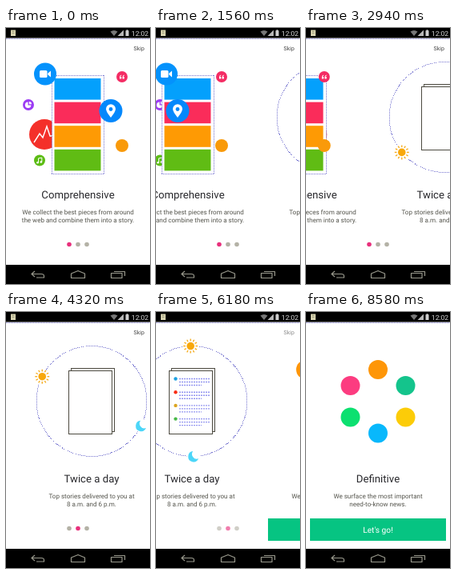
An HTML page that plays this animation: 180x320 px, repeating every 8760 ms.

```html
<!DOCTYPE html>
<html lang="en">
<head>
<meta charset="utf-8">
<title>App introduction</title>
<style>
  html, body { margin: 0; width: 100%; height: 100%; overflow: hidden; background: #fff; }
  svg { display: block; width: 100vw; height: 100vh; }
  text { font-family: Roboto, sans-serif; text-rendering: geometricPrecision; }
  .title { font-size: 13.2px; fill: #28282c; text-anchor: middle; }
  .body { font-size: 8.05px; fill: #54544c; text-anchor: middle; }
  .dotted { fill: none; stroke: #7674d0; stroke-width: 1; stroke-dasharray: 1 1; shape-rendering: crispEdges; }
  .line { fill: none; stroke: #fff; stroke-width: 1.4; }
  .nav { fill: none; stroke: #98988c; stroke-width: 1.2; stroke-linejoin: round; }
</style>
</head>
<body>
<svg id="stage" viewBox="0 0 180 320" preserveAspectRatio="none"></svg>
<script>
const LOOP = 8760, STEP = 60, PAGE = 180;

// [time, scroll offset]
const SCROLL = [[60, 0], [1560, 50], [2940, 97], [4320, 163], [4640, 180],
                [5480, 180], [6180, 225], [7260, 292], [8100, 343], [8520, 360]];

const circle = (x, y, r, fill) => `<circle cx="${x}" cy="${y}" r="${r}" fill="${fill}"/>`;
const rect = (x, y, w, h, attrs) => `<rect x="${x}" y="${y}" width="${w}" height="${h}" ${attrs}/>`;
const fill = color => `fill="${color}"`;
const path = (d, attrs) => `<path d="${d}" ${attrs}/>`;
const text = (x, y, cls, words) => `<text x="${x}" y="${y}" class="${cls}">${words}</text>`;
const copy = (title, first, second) =>
  text(90, 213, 'title', title) + text(90, 233.2, 'body', first) + text(90, 243.2, 'body', second);

// A part that scrolls at its own rate and rests at x, y on its page.
const floating = (page, x, y, rate, art) =>
  `<g data-page="${page}" data-x="${x}" data-y="${y}" data-rate="${rate}">${art}</g>`;
const badge = (x, y, r, color, rate, art = '') =>
  floating(0, x, y, rate, circle(0, 0, r, color) + art);
const ball = (x, y, color, rate) => floating(2, x, y, rate, circle(0, 0, 12, color));

const quote = x => path(`M${x} 2.4h2.3v-2.3h-1.2q0-1.3 1.2-1.7v-1q-2.3.5-2.3 3z`, fill('#fff'));

function cardPage() {
  const bars = ['#04a0fc', '#fa2c5a', '#fe9a04', '#60bc14'];
  const card = rect(57.5, 59.5, 65, 123, fill('#fff')) +
    path('M57 59.5H123M57 182.5H123M57.5 59V183M122.5 59V183', 'class="dotted"') +
    bars.map((c, i) => rect(60.5, 63 + i * 29.6, 58, 26.6, fill(c))).join('');
  return badge(48, 133, 19, '#f4302a', .42,
      path('M-13 10L-6-1L-2 4L3-10L7 2H10', 'class="line"')) +
    badge(28, 96, 7, '#9c3cf4', .46,
      path('M-.5-3.6A3.8 3.8 0 1 0 3.4.5H-.5zM.8-4V-.8H4A3.2 3.2 0 0 0 .8-4', fill('#fff'))) +
    badge(42, 165.5, 7, '#5cbc14', .74,
      path('M-1.5 2.6V-2.6L2.8-3.4V1.8', 'class="line" style="stroke-width:1"') +
      circle(-2.5, 2.7, 1.3, '#fff') + circle(1.8, 2, 1.3, '#fff')) +
    floating(0, 0, 0, 1, card + copy('Comprehensive',
      'We collect the best pieces from around', 'the web and combine them into a story.')) +
    badge(49, 57.5, 14, '#0492fc', .72,
      rect(-7, -4.5, 9.5, 9, 'rx="1.5" fill="#fff"') + path('M3.2-.8L7-4V4L3.2.8z', fill('#fff'))) +
    badge(145, 61, 7, '#f42c64', 1.26, quote(-3) + quote(.6)) +
    badge(145, 147, 8, '#f99a0a', 1.26) +
    badge(131, 103.5, 14.5, '#0488fc', 2.08,
      path('M0 8.5Q-6 1-6-2.2A6 6 0 0 1 6-2.2Q6 1 0 8.5z', fill('#fff')) + circle(0, -2, 2.4, '#0488fc'));
}

function orbitPage() {
  let rays = '';
  for (let a = 0; a < 360; a += 30)
    rays += path('M0-6.3V-9', `stroke="#f5a914" stroke-width="1.3" transform="rotate(${a})"`);
  const sheet = 'fill="#fff" stroke="#4c4a40" stroke-width="1"';
  const rows = ['#1ca0e0', '#f82c14', '#dca420', '#48b848'].map((c, i) => {
    const y = 83.5 + i * 16.7;
    const lines = [0, 4, 8].map((dy, k) =>
      path(`M74 ${y + dy}h${k < 2 ? 38 : 28}`, 'stroke="#9496f0" stroke-width="1.4" stroke-dasharray="2 1"'));
    return `<g class="row">${circle(69.5, y, 2.2, c)}${lines.join('')}</g>`;
  }).join('');
  return floating(1, 0, 0, 1,
    '<circle cx="90" cy="111.5" r="69" class="dotted"/>' +
    rect(64.5, 70.5, 54, 79, sheet) + rect(61.5, 73.5, 54, 79, sheet) + rows +
    `<g id="sun">${circle(0, 0, 10, '#fff')}${rays}${circle(0, 0, 4.8, '#f8a80c')}</g>` +
    `<g id="moon">${circle(0, 0, 8.5, '#fff')}${
      path('M-.5-6.5A6.7 6.7 0 1 0 6.3 2.8A6 6 0 0 1-.5-6.5z', fill('#4cd6f8'))}</g>` +
    copy('Twice a day', 'Top stories delivered to you at', '8 a.m. and 6 p.m.'));
}

function finalPage() {
  return ball(90, 72, '#fe9608', .72) + ball(124.5, 92, '#14c48c', 1.27) +
    ball(124.5, 131.5, '#fccc08', .72) + ball(90, 151.5, '#08b8fc', 1.76) +
    ball(55.5, 131.5, '#0ce070', 1.13) + ball(55.5, 92, '#fc3c80', 1.76) +
    floating(2, 0, 0, 1, copy('Definitive', 'We surface the most important', 'need-to-know news.') +
      rect(5, 258, 170, 28, fill('#06c482')) +
      '<text x="90" y="275.5" font-size="10.2" fill="#fff" text-anchor="middle">Let\'s go!</text>');
}

function systemBars() {
  return rect(0, 0, 180, 12.5, fill('#000')) + path('M0 13.5H180', 'class="dotted"') +
    rect(6, 2.5, 6, 7.5, fill('#d8d4b0')) + path('M7.5 4.5h3M7.5 6.5h3', 'stroke="#8c886c" stroke-width=".7"') +
    path('M130.5 4.5Q135 1.5 139.5 4.5L135 10z', fill('#787878')) +
    path('M147 2.5V10H139.5z', fill('#b8b8b8')) +
    path('M149.5 3.2h1v-1h2v1h1V10h-4z', fill('#d0d0d0')) +
    '<text x="156.8" y="9.6" font-size="8.6" fill="#d4d4d4">12:02</text>' +
    rect(0, 296, 180, 24, fill('#000')) +
    path('M36 304L32 307.5L36 311M32.5 307.5H44Q47.5 307.5 47.5 310V312H38', 'class="nav"') +
    path('M81.5 307L90 303.5L98.5 307V312.5H81.5z', 'class="nav"') +
    path('M131.5 306.5H145V312.5H131.5zM135 304.5H148.5V310', 'class="nav"');
}

const stage = document.getElementById('stage');
stage.innerHTML = rect(0, 0, 180, 320, fill('#fff')) + cardPage() + orbitPage() + finalPage() +
  '<g id="guide"><text x="159.5" y="27.5" font-size="7.1" fill="#484848">Skip</text>' +
  [79, 90, 101].map(x => `<circle class="pager" cx="${x}" cy="270.5" r="2.8"/>`).join('') + '</g>' +
  systemBars();

const find = id => document.getElementById(id);
const parts = [...stage.querySelectorAll('[data-page]')];
const rows = [...stage.querySelectorAll('.row')];
const pagers = [...stage.querySelectorAll('.pager')];
const sun = find('sun'), moon = find('moon'), guide = find('guide');

function scrollAt(time) {
  if (time <= SCROLL[0][0]) return 0;
  const i = SCROLL.findIndex(key => key[0] >= time);
  if (i < 0) return 2 * PAGE;
  const [t0, s0] = SCROLL[i - 1], [t1, s1] = SCROLL[i];
  return s0 + (s1 - s0) * (time - t0) / (t1 - t0);
}

function move(node, x, y) {
  node.setAttribute('transform', `translate(${x.toFixed(2)} ${y.toFixed(2)})`);
}

function draw(time) {
  const scroll = scrollAt(time);
  for (const part of parts) {
    const { page, x, y, rate } = part.dataset;
    move(part, +x + (page * PAGE - scroll) * rate, +y);
  }
  // The orbit makes half a turn for each page.
  const angle = (scroll - 226.5) * Math.PI / 180;
  const dx = 69 * Math.sin(angle), dy = -69 * Math.cos(angle);
  move(sun, 90 + dx, 111.5 + dy);
  move(moon, 90 - dx, 111.5 - dy);
  rows.forEach((row, i) => {
    row.style.opacity = Math.min(1, Math.max(0, (time - 4560 - i * 180) / 180));
  });
  const active = scroll < 130 ? 0 : 1;
  pagers.forEach((dot, i) => dot.setAttribute('fill', i === active ? '#e8307c' : '#b4b2a6'));
  guide.style.opacity = Math.min(1, Math.max(0, 1 - 1.5 * (scroll / PAGE - 1)));
}

const start = performance.now();
function tick() {
  const time = (performance.now() - start) % LOOP;
  draw(Math.floor(time / STEP) * STEP);
  requestAnimationFrame(tick);
}
tick();
</script>
</body>
</html>
```
